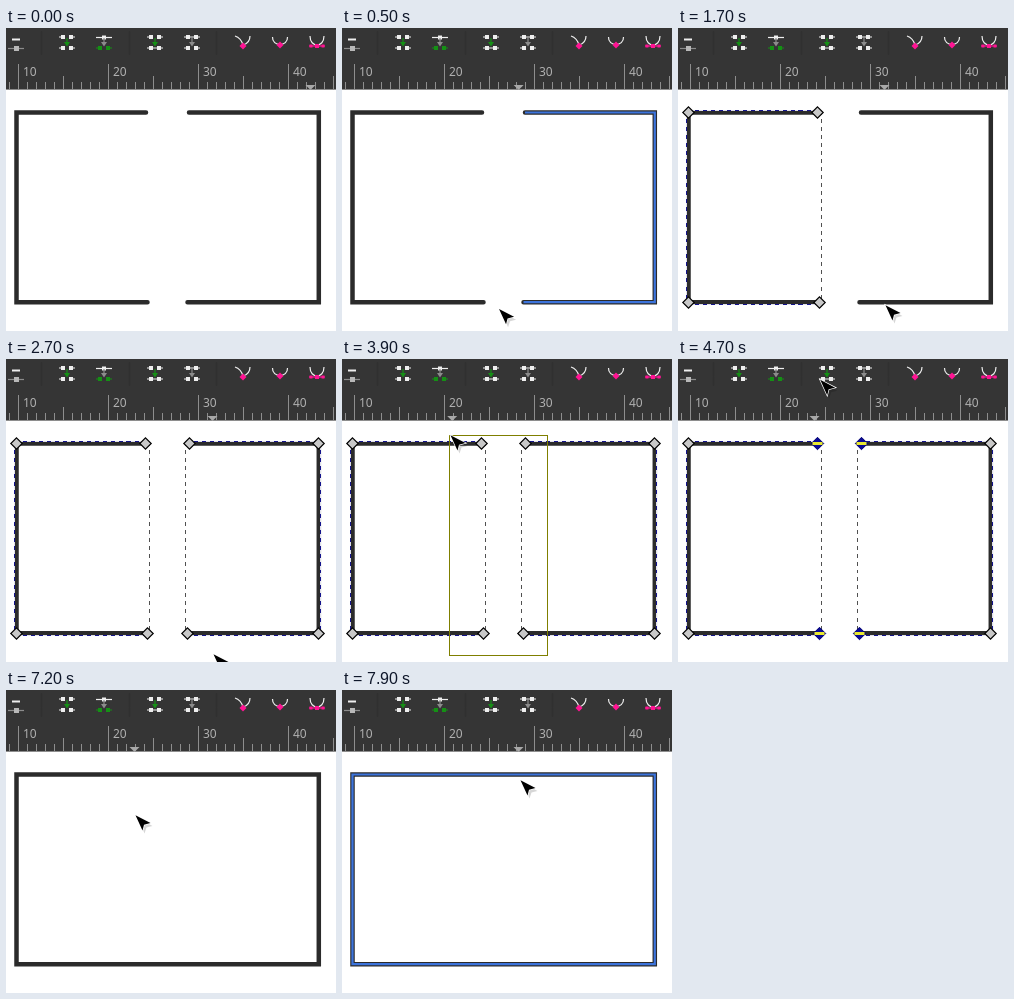
Animation, 330 px wide and 303 px high, one loop 8 s. Source, as an HTML page:

```html
<!DOCTYPE html>
<html lang="en">
<head>
<meta charset="utf-8">
<title>Joining two open paths</title>
<style>
  html, body { margin: 0; width: 100%; height: 100%; overflow: hidden; background: #fff; }
  svg { display: block; width: 330px; height: 303px; }
  text { font: 12px "Noto Sans", "Open Sans", sans-serif; fill: #b0b0b0; }
  .ink { fill: none; stroke: #2b2b2b; stroke-width: 4.5; stroke-linecap: round; }
  .flash { fill: none; stroke: #3c74dc; stroke-width: 2.2; }
  .gap, .dash { fill: none; stroke: #fff; shape-rendering: crispEdges; }
  .dash { stroke-dasharray: 4 4; }
</style>
</head>
<body>
<svg viewBox="0 0 330 303">
  <g id="drawing"></g>
  <g id="selection"></g>
  <rect id="band" fill="none" stroke="#7f7f00" shape-rendering="crispEdges"/>
  <rect width="330" height="62" fill="#353535"/>
  <g id="toolbar"></g>
  <g id="ruler"></g>
  <path id="marker" d="M-5 57H5L0 62Z" fill="#a8a8a8"/>
  <g id="cursor">
    <path d="M3 3L17.5 11L11.5 12.5L9.5 18.5Z" fill="#000" opacity=".16"/>
    <path d="M.5 .2L15.5 8L9 9.7L7.5 15.5Z" fill="#000" stroke="#fff" stroke-width="1.4" paint-order="stroke"/>
  </g>
</svg>
<script>
const $ = id => document.getElementById(id);
const LOOP = 8000, STEP = 100;

// Frame of the drawing, the gap in it, and the dashed bounds around it
const L = 10.5, R = 312.8, T = 84.5, B = 274.2;
const gapL = 141, gapR = 182;
const left = `M${gapL - 1} ${T}H${L}V${B}H${gapL + 0.5}`;
const right = `M${gapR + 1} ${T}H${R}V${B}H${gapR - 0.5}`;
const whole = `M${L} ${T}H${R}V${B}H${L}Z`;
const outer = { left: 8.5, right: 314.5, top: 82.5, bottom: 276.5 };

// Each move: start, end, target x, target y, easing power
const home = [305, 304];
const moves = [
  [0, 900, 120, 275],
  [1000, 1500, 207, 277, 4],
  [2400, 2700, 207, 295],
  [2900, 3100, 205, 307],
  [3200, 3300, 205, 296],
  [3300, 3900, 108, 76],
  [4200, 5100, 150, 7],
  [5200, 5800, 136, 120],
  [6400, 6600, 131, 124],
  [6800, 7000, 129, 125],
  [7200, 7900, 178, 90]
];

const within = (t, from, to) => t >= from && t < to;

function pointerAt(t) {
  let [x, y] = home;
  for (const [from, to, tx, ty, power = 2] of moves) {
    if (t <= from) break;
    const u = Math.min(1, (t - from) / (to - from));
    const eased = 1 - (1 - u) ** power;
    x += (tx - x) * eased;
    y += (ty - y) * eased;
  }
  return [x, y];
}

const path = (cls, d, stroke) => `<path class="${cls}" d="${d}"${stroke ? ` stroke="${stroke}"` : ""}/>`;

function node(x, y, active) {
  const r = active ? 6.2 : 5.7;
  const diamond = `M${x} ${y - r}l${r} ${r}l${-r} ${r}l${-r} ${-r}Z`;
  if (!active) return `<path d="${diamond}" fill="#c8c8c8" stroke="#000" stroke-width="1.2"/>`;
  return `<path d="${diamond}" fill="#0a0a96" stroke="#000070"/>` +
    `<path d="M${x - 5} ${y}h10" stroke="#e8e830" stroke-width="3"/>`;
}

// A corner pair and an end pair; side is -1 for the left half, 1 for the right
function nodes(side, active) {
  const corner = side < 0 ? 10.5 : 312.5, end = side < 0 ? gapL : gapR;
  const top = 84.5, bottom = 274.5;
  return node(corner, top) + node(corner, bottom) +
    node(end - 0.5 + side * (side < 0 ? 1 : 2), top, active) +
    node(end + 0.5 - (side < 0 ? 0 : 1), bottom, active);
}

function bounds(x0, x1) {
  const { top, bottom } = outer;
  const d = `M${x0} ${top}H${x1}V${bottom}H${x0}Z`;
  const inkSide = x => x === outer.left || x === outer.right;
  const sides = [x0, x1].map(x =>
    path("dash", `M${x} ${top}V${bottom}`, inkSide(x) ? "#14148c" : "#505050")).join("");
  return `<path d="${d}" fill="none" stroke="#e0e0ea" shape-rendering="crispEdges"/>` +
    [x0, x1].filter(x => !inkSide(x)).map(x => path("gap", `M${x} ${top + 4}V${bottom - 4}`)).join("") +
    `<path d="M${x0} ${top}H${x1}M${x0} ${bottom}H${x1}" fill="none" stroke="#14148c" ` +
    `stroke-dasharray="4 4" shape-rendering="crispEdges"/>` +
    sides.replace(/class="dash"/g, `fill="none" stroke-dasharray="4 4" shape-rendering="crispEdges"`);
}

function drawing(t) {
  let s = t >= 5100 ? path("ink", whole) : path("ink", left) + path("ink", right);
  if (within(t, 600, 1200)) s += path("flash", left);
  if (within(t, 100, 600) || within(t, 1200, 1700)) s += path("flash", right);
  if (t >= 7700) s += path("flash", whole);
  return s;
}

function selection(t) {
  if (!within(t, 1100, 6900)) return "";
  const active = within(t, 4300, 6100);
  const joined = t >= 5100, both = t >= 2300;
  let s = joined ? bounds(outer.left, outer.right) : bounds(outer.left, gapL + 2.5);
  if (both && !joined) s += bounds(gapR - 2.5, outer.right);
  return s + nodes(-1, active) + (both ? nodes(1, active) : "");
}

function toolbar() {
  const white = "#eee", grey = "#8c8c8c", green = "#159015", pink = "#ff1493";
  const sq = (x, y, c, size = 4) =>
    `<rect x="${x - size / 2}" y="${y - size / 2}" width="${size}" height="${size}" fill="${c}"/>`;
  const line = (d, c) => `<path d="${d}" fill="none" stroke="${c}" stroke-width="1.2"/>`;
  const pair = (x, y, c, link) => sq(x - 4, y, c) + sq(x + 4, y, c) +
    line(`M${x - 8} ${y}h4M${x + 4} ${y}h4` + (link ? `M${x - 4} ${y}h8` : ""), c);
  const arrow = (x, c) => line(`M${x} 10V15`, c) + `<path d="M${x - 3} 14h6l-3 4.5Z" fill="${c}"/>`;
  const gem = (x, y) => `<path d="M${x} ${y - 3.5}l3.5 3.5l-3.5 3.5l-3.5 -3.5Z" fill="${pink}"/>`;
  const gaps = [35.5, 123.5, 210.5].map(x => line(`M${x} 3V27`, "#303030")).join("");
  return gaps +
    line("M6 11h8M6 12h8", white) + line("M2 20.5h16", grey) + sq(10.5, 20.5, "#b8b8b8", 5) +
    pair(61, 9, white) + arrow(61, green) + pair(61, 20, white) +
    line("M90 9.5h16", white) + sq(98, 9.5, white) + arrow(98, grey) + pair(98, 20, green) +
    pair(149, 9, white) + arrow(149, green) + pair(149, 20, white, true) +
    pair(186, 9, white, true) + arrow(186, grey) + pair(186, 20, white) +
    line("M229 8Q235 10 237 17Q244 15 244 8", white) + gem(237, 18) +
    line("M266.5 9C266 19 282 19 281.5 9", white) + gem(274, 17) +
    line("M304 8C304 20 318 20 318 8", white) + line("M303 18h16", pink) +
    sq(305, 18, pink, 3) + sq(311, 18, pink) + sq(317, 18, pink, 3);
}

function ruler() {
  let ticks = "M0 61.5H330", labels = "";
  for (let i = -1; i < 36; i++) {
    const x = 12.5 + i * 9;
    ticks += `M${x} ${i % 10 === 0 ? 36 : i % 5 === 0 ? 48 : 54}V61`;
    if (i % 10 === 0) labels += `<text x="${x + 4.5}" y="48">${10 + i}</text>`;
  }
  return `<path d="${ticks}" stroke="#8e8e8e" shape-rendering="crispEdges"/>` + labels;
}

function set(id, attributes) {
  for (const name in attributes) $(id).setAttribute(name, attributes[name]);
}

function render(t) {
  const [x, y] = pointerAt(t);
  // The ruler marker trails the pointer by one step
  const [markX] = pointerAt(t - STEP);
  $("drawing").innerHTML = drawing(t);
  $("selection").innerHTML = selection(t);
  set("cursor", { transform: `translate(${x} ${y})` });
  set("marker", { transform: `translate(${markX - 0.5} 0)` });
  const bx = Math.round(x) - 0.5, by = Math.round(y) + 0.5;
  set("band", {
    visibility: within(t, 3400, 4300) ? "visible" : "hidden",
    x: bx, y: by,
    width: Math.max(0, 205.5 - bx), height: Math.max(0, 296.5 - by)
  });
}

$("toolbar").innerHTML = toolbar();
$("ruler").innerHTML = ruler();

const start = performance.now();
let shown = -1;
function tick() {
  const t = Math.floor((performance.now() - start) % LOOP / STEP) * STEP;
  if (t !== shown) render(shown = t);
  requestAnimationFrame(tick);
}
tick();
</script>
</body>
</html>
```
